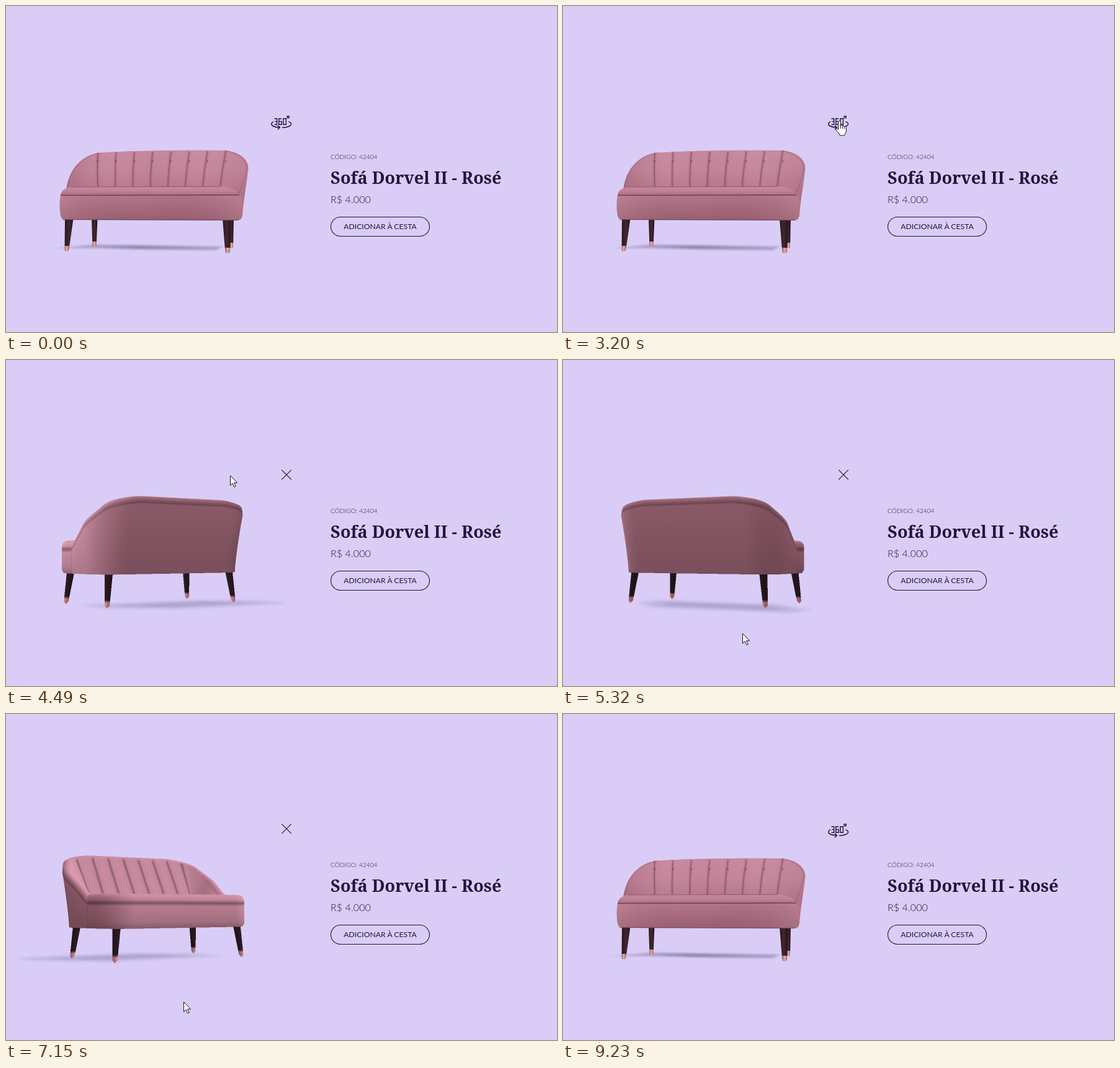
An HTML page with a canvas for the animation above (9.9 s loop, 888x526 px).

```html
<!DOCTYPE html>
<html lang="pt-BR">
<head>
<meta charset="utf-8">
<title>Sofá Dorvel II</title>
<style>
html, body { margin: 0; width: 100%; height: 100%; overflow: hidden; background: #d9cdf7; }
canvas, svg { position: absolute; left: 0; top: 0; display: block; }
text { fill: #221538; font-family: Lato, sans-serif; }
.line { fill: none; stroke: #221538; }
</style>
</head>
<body>
<canvas id="stage" width="888" height="526"></canvas>
<svg width="888" height="526" viewBox="0 0 888 526">
  <text x="523" y="247" font-size="10.2" font-weight="300">CÓDIGO: 42404</text>
  <text x="523" y="287" font-size="27.1" font-weight="600" style="font-family:'Noto Serif',serif">Sofá Dorvel II - Rosé</text>
  <text x="523" y="318" font-size="16.2" font-weight="300">R$ 4.000</text>
  <rect class="line" x="523.5" y="340.5" width="159" height="31" rx="15.5" stroke-width="1.1"/>
  <text x="603" y="360" font-size="12.2" text-anchor="middle">ADICIONAR À CESTA</text>
  <g id="turn" class="line" stroke-width="1.4">
    <path d="M432.5 181.8h4.2v9.4h-4.2M433.2 186.4h3.5M444.2 181.8h-4.4v9.4h4.4v-4.8h-4.4M447 181.8h4.4v9.4h-4.4z"/>
    <path d="M453.2 177.7h2.9v2.9h-2.9z"/>
    <path d="M431 186.6c-4.5 2-4 5.6 0 7.4 3 1.3 6.3 1.8 10 2M437.8 192.6l3.7 3.4-3.7 3.3M445 196.2c8-.2 14.6-2.4 14.6-5.6 0-1.700-1.600-3-4.200-4"/>
  </g>
  <path id="close" class="line" stroke-width="1.2" d="M444.3 177.3l15.500 15.500M459.800 177.300l-15.500 15.500"/>
  <g id="cursor" stroke="#17121f" stroke-linejoin="round" fill="#fdfcff">
    <path id="arrow" d="M.5.5v15.800l3.600-3.300 2.700 5.900 2.500-1.100-2.700-5.700h5z"/>
    <g id="hand">
      <path d="M-2 2C-2-.1 1.600-.1 1.600 2V8.500C1.700 6.600 5 6.600 5 9 5.300 7.500 8 7.700 8 10 8.500 8.800 10.700 9 10.700 11.400V16C10.700 19 8.500 20.500 8 23.400 5 24.200 2 24 0 23.200-.5 20.500-4.300 17.500-6 14.300-6.400 12.600-4.400 11.700-2 14.300z"/>
      <path fill="none" d="M1.600 8.500v4.300M5 9v4M8 10v3.500"/>
    </g>
  </g>
</svg>
<script>
const LOOP = 9900, STEP = 68, SPIN = [3470, 8630];
const $ = id => document.getElementById(id);
const ctx = $('stage').getContext('2d');
const clamp = (v, a, b) => Math.max(a, Math.min(b, v));
const mix = (a, b, k) => a + (b - a) * k;

// Pointer strokes: start, end, bend x, y, goal x, y
const ENTRY = [804, 500], STROKES = [
  [580, 1350, 600, 325, 596, 365],
  [1600, 2590, 85, 262, 308, 249],
  [2640, 3200, 410, 180, 446, 185],
  [3470, 4490, 420, 156, 361, 186],
  [4490, 5450, 310, 270, 286, 464],
  [7150, 8220, 410, 400, 453, 186],
  [8890, 9230, 650, 320, 900, 520]
];
// Time and direction the sofa faces, in degrees
const TURNS = [[3470, -10], [4490, -145], [6130, -275], [7150, -325], [8220, -402], [8560, -425]];

const snap = (t, start) => start + Math.round((t - start) / STEP) * STEP;

function pointer(t) {
  let from = ENTRY;
  for (const [a, b, cx, cy, x, y] of STROKES) {
    if (t < a) break;
    const lin = clamp((snap(t, a) - a) / (b - a), 0, 1);
    const k = lin * lin * (3 - 2 * lin);
    const bend = (p, c, q) => mix(mix(p, c, k), mix(c, q, k), k);
    from = [bend(from[0], cx, x), bend(from[1], cy, y)];
  }
  return from;
}

function yaw(t) {
  const now = snap(t, SPIN[0]);
  const i = TURNS.findIndex(k => now < k[0]);
  if (i < 1) return TURNS[i ? TURNS.length - 1 : 0][1];
  const [a, p] = TURNS[i - 1], [b, q] = TURNS[i];
  return mix(p, q, (now - a) / (b - a));
}

// ---- Sofa mesh: x along the length, y down, z to the front ----
const A = 138, D = 74, R = 40, MID = 12, FLOOR = 80;
const LIGHT = [0.62, -0.62, 0.38], DARK = [124, 78, 91], PALE = [226, 160, 182];
const verts = [], tris = [];

function patch(cols, rows, pos, tint) {
  const at = (i, j) => clamp(i, 0, cols) * (rows + 1) + clamp(j, 0, rows);
  const pts = [], base = verts.length;
  for (let i = 0; i <= cols; i++) for (let j = 0; j <= rows; j++) pts.push(pos(i, j));
  const diff = (a, b) => pts[a].map((v, n) => v - pts[b][n]);
  for (let i = 0; i <= cols; i++) for (let j = 0; j <= rows; j++) {
    const u = diff(at(i + 1, j), at(i - 1, j)), v = diff(at(i, j + 1), at(i, j - 1));
    const n = [v[1] * u[2] - v[2] * u[1], v[2] * u[0] - v[0] * u[2], v[0] * u[1] - v[1] * u[0]];
    const len = Math.hypot(...n) || 1;
    const lit = 0.5 + 0.5 * n.reduce((s, c, m) => s + c * LIGHT[m], 0) / len;
    verts.push([...pts[at(i, j)], ...tint(i, j, clamp(lit, 0, 1))]);
    if (i < cols && j < rows) {
      const a = base + at(i, j), b = base + at(i + 1, j), c = base + at(i + 1, j + 1), d = base + at(i, j + 1);
      tris.push([a, b, c], [a, c, d]);
    }
  }
}

const cloth = (lit, dim) => DARK.map((c, n) => mix(c, PALE[n], Math.pow(lit, 1.4)) * dim);

// Point and outward normal on the rounded footprint
function ring(s) {
  const side = 2 * D, long = 2 * A;
  let x, z;
  if (s < side) [x, z] = [A, D - s];
  else if (s < side + long) [x, z] = [A + side - s, -D];
  else if (s < 2 * side + long) [x, z] = [-A, s - side - long - D];
  else [x, z] = [s - 2 * side - long - A, D];
  const cx = clamp(x, R - A, A - R), cz = clamp(z, R - D, D - R);
  const len = Math.hypot(x - cx, z - cz), nx = (x - cx) / len, nz = (z - cz) / len;
  return { x: cx + nx * R, z: cz + nz * R, nx, nz };
}

// Straight sides, then a rounded cushion edge closed at the middle
function buildSeat() {
  const rows = 14, seam = 8, s = i => i * 4 % 848;
  patch(212, rows, (i, j) => {
    const p = ring(s(i)), a = clamp(j - 9, 0, 4) * Math.PI / 8;
    const y = 30 - 4.7 * Math.min(j, 9) - 9 * Math.sin(a);
    const off = 10 * (Math.cos(a) - 1) - (j ? 0 : 3) - (p.z < 2 ? 4 : 0);
    const pull = j < rows ? 1 : 0;
    return [(p.x + p.nx * off) * pull, y, MID + (p.z + p.nz * off) * pull];
  }, (i, j, lit) => cloth(lit, j === seam && ring(s(i)).z > 6 ? 0.66 : 0.84 + 0.16 * Math.min(1, j / seam)));
}

// Back and arms as one shell: up the outside, over the rail, down the inside
function buildShell() {
  const first = 62, last = 510, cols = 224, outer = 12, rim = outer + 4, rows = rim + 8;
  const pos = i => first + 2 * i;
  function profile(s, j) {
    const k = Math.sin(Math.PI / 2 * clamp(Math.min(s - first, last - s) / 150, 0, 1));
    const top = -12 - 71 * k;
    const flare = y => 20 * Math.pow(Math.max(0, 30 - y) / 115, 1.3) * (0.3 + 0.7 * k) + 0.3;
    if (j <= outer) {
      const y = j < outer ? mix(30, top + 9, j / (outer - 1)) : top + 6.5;
      return [y, flare(y)];
    }
    if (j < rim) {
      const a = (j - outer) * Math.PI / 4;
      return [top + 3 - 6 * Math.sin(a), flare(top) - 7 + 7 * Math.cos(a)];
    }
    const f = (j - rim) / 8;
    return [mix(top + 3, -16, f), mix(flare(top) - 14, -30, f)];
  }
  patch(cols, rows, (i, j) => {
    const p = ring(pos(i)), [y, off] = profile(pos(i), j);
    return [p.x + p.nx * off, y, MID + p.z + p.nz * off];
  }, (i, j, lit) => {
    const m = pos(i) - 286;
    let dim = i < 1 || i === cols || j === outer ? 0.74 : j < outer ? 0.86 + 0.012 * j : 1;
    if (j >= rim && Math.abs(m) < 110) {
      const gap = Math.abs(((m % 30) + 30) % 30 - 15);
      dim *= 1 - 0.3 * Math.exp(-gap * gap / 3) - 0.08 * Math.exp(-gap / 5);
    }
    return cloth(lit, dim);
  });
}

function buildLeg(sx, sz) {
  const rows = 12;
  patch(12, rows, (i, j) => {
    const k = j / rows, r = j < rows ? 6 - 2.6 * k : 0, a = i * Math.PI / 6;
    return [sx * (116 + 6 * k) + r * Math.cos(a), 29 + 51 * k, 10 + sz * (58 + 5 * k) + r * Math.sin(a)];
  }, (i, j, lit) => (j < 10 ? [44, 26, 33] : [200, 135, 137]).map(c => c * (0.65 + 0.5 * lit)));
}

buildSeat();
buildShell();
for (const sx of [-1, 1]) for (const sz of [-1, 1]) buildLeg(sx, sz);

// ---- Projection and depth-buffered drawing at double size ----
const BW = 900, BH = 460, TOP = 190, FAR = 1245;
const buf = document.createElement('canvas');
buf.width = BW;
buf.height = BH;
const bctx = buf.getContext('2d');
const image = bctx.createImageData(BW, BH), depth = new Float32Array(BW * BH);

function project(x, y, z, c, s) {
  const d = x * s - z * c, k = FAR / (FAR + d);
  return [239 + (x * c + z * s) * k, 313 + y * k, d];
}

function fillTri(a, b, c) {
  const area = (b[0] - a[0]) * (c[1] - a[1]) - (b[1] - a[1]) * (c[0] - a[0]);
  if (Math.abs(area) < 1e-6) return;
  const x0 = Math.max(0, Math.ceil(Math.min(a[0], b[0], c[0])));
  const x1 = Math.min(BW - 1, Math.floor(Math.max(a[0], b[0], c[0])));
  const y0 = Math.max(0, Math.ceil(Math.min(a[1], b[1], c[1])));
  const y1 = Math.min(BH - 1, Math.floor(Math.max(a[1], b[1], c[1])));
  const px = image.data;
  for (let y = y0; y <= y1; y++) for (let x = x0; x <= x1; x++) {
    const u = ((b[0] - x) * (c[1] - y) - (b[1] - y) * (c[0] - x)) / area;
    const v = ((c[0] - x) * (a[1] - y) - (c[1] - y) * (a[0] - x)) / area;
    const w = 1 - u - v;
    if (u < -1e-5 || v < -1e-5 || w < -1e-5) continue;
    const d = u * a[2] + v * b[2] + w * c[2], i = y * BW + x;
    if (d >= depth[i]) continue;
    depth[i] = d;
    for (let n = 0; n < 3; n++) px[i * 4 + n] = u * a[3 + n] + v * b[3 + n] + w * c[3 + n];
    px[i * 4 + 3] = 255;
  }
}

function drawTurned(deg) {
  const c = Math.cos(deg * Math.PI / 180), s = Math.sin(deg * Math.PI / 180);
  ctx.save();
  ctx.beginPath();
  ctx.rect(0, 0, 448, 526);
  ctx.clip();
  ctx.filter = 'blur(2px)';
  ctx.fillStyle = 'rgba(84,74,118,.16)';
  for (const d of [0, 35, 70]) {
    ctx.beginPath();
    for (const [x, z] of [[-120, -50], [120, -50], [120, 35], [-120, 35]]) {
      ctx.lineTo(...project(x - d, FLOOR, z - d, c, s).slice(0, 2));
    }
    ctx.fill();
  }
  ctx.restore();

  image.data.fill(0);
  depth.fill(1e9);
  const pts = verts.map(v => {
    const p = project(v[0], v[1], v[2], c, s);
    return [p[0] * 2, (p[1] - TOP) * 2, p[2], v[3], v[4], v[5]];
  });
  for (const [i, j, k] of tris) fillTri(pts[i], pts[j], pts[k]);
  bctx.putImageData(image, 0, 0);
  ctx.drawImage(buf, 0, TOP, BW / 2, BH / 2);
}

// ---- Front view at rest ----
function ramp(x0, y0, x1, y1, ...stops) {
  const g = ctx.createLinearGradient(x0, y0, x1, y1);
  stops.forEach((c, i) => g.addColorStop(i / (stops.length - 1), c));
  return g;
}

function shape(d, fill) {
  ctx.fillStyle = fill;
  ctx.fill(new Path2D(d));
}

function line(d, color, width) {
  ctx.strokeStyle = color;
  ctx.lineWidth = width;
  ctx.stroke(new Path2D(d));
}

function frontLeg(x0, x1, b0, b1, foot) {
  const f = 1 - 9 / (foot - 345), l = mix(x0, b0, f), r = mix(x1, b1, f), y = foot - 9;
  shape(`M${x0} 343H${x1}L${r} ${y}H${l}z`, ramp(x0, 0, x1, 0, '#2a181f', '#43272f', '#22131a'));
  shape(`M${l} ${y}H${r}L${b1} ${foot - 1.5}Q${(b0 + b1) / 2} ${foot + 2} ${b0} ${foot - 1.5}z`,
    ramp(b0, 0, b1, 0, '#a3646a', '#e2b0ae', '#a9696d'));
}

function drawFront() {
  ctx.save();
  ctx.filter = 'blur(1.5px)';
  shape('M74 391L138 385 350 388 338 394 240 393 150 391z',
    ramp(74, 0, 350, 0, 'rgba(100,90,130,.15)', 'rgba(100,90,130,.6)', 'rgba(100,90,130,.35)'));
  ctx.restore();
  frontLeg(138, 147.5, 139.5, 145.5, 389);
  frontLeg(358, 367, 361, 366, 391);
  frontLeg(95, 108.5, 94.5, 101, 396);
  frontLeg(349, 362.5, 353.5, 361, 399);

  const back = 'M97 297C101 264 121 240 152 236.5 205 233 290 232 352 233 376 235 391 247 390.5 262 389 282 383 310 381 338L376 344H300V310H97z';
  shape(back, ramp(0, 233, 0, 300, '#c98ba1', '#c4859a', '#b4768a'));
  shape(back, ramp(97, 0, 391, 0, 'rgba(120,70,90,.25)', 'rgba(210,150,170,.12)', 'rgba(150,90,110,.05)', 'rgba(220,160,180,.1)', 'rgba(130,80,100,.12)'));
  for (let i = 0; i < 8; i++) {
    const x = 148 + 29.5 * i, foot = 148 + 28.2 * i;
    const curve = `M${x} ${236.5 - i * 0.4}Q${(x + foot) / 2 - 1.5} 262 ${foot} 292`;
    line(curve, 'rgba(125,72,92,.16)', 6);
    line(curve, 'rgba(105,58,78,.62)', 1.2);
    shape(`M${x - 2} 249h3v3h-3z`, 'rgba(95,50,70,.4)');
  }
  line('M352 233.5C377 237 389 250 388 263 385 281 378 296 374 304', 'rgba(110,62,82,.45)', 1);
  line('M99 292C104 264 123 242 152 237.5', 'rgba(115,66,86,.35)', 1);

  shape('M88 306C88 297 97 292 112 291.5L340 291C362 291 374 297 377 306z', ramp(0, 291, 0, 306, '#c7889d', '#c08196', '#a96c7f'));
  line('M105 292L345 291.3', 'rgba(105,58,78,.55)', 1);
  const base = 'M88 305.5C86 314 86 334 89 341Q91 345 97 345L371 346Q379 346 380.5 340L381 312 376 305z';
  shape(base, ramp(0, 305, 0, 346, '#b5778a', '#a66b7d', '#966070'));
  shape(base, ramp(87, 0, 381, 0, 'rgba(215,155,175,.25)', 'rgba(150,95,110,0)', 'rgba(140,85,105,.12)', 'rgba(205,145,165,.3)'));
  line('M88 305.5L376 305', '#70424f', 1.3);
  line('M91 344.5L374 345.5', 'rgba(85,48,60,.6)', 1.2);
}

// ---- Playback ----
let pose = null;

function render(now) {
  const t = now % LOOP, spin = t >= SPIN[0] && t < SPIN[1];
  const next = spin ? yaw(t) : 'rest';
  if (next !== pose) {
    pose = next;
    ctx.clearRect(0, 0, 888, 526);
    if (spin) drawTurned(next);
    else drawFront();
  }
  const [x, y] = pointer(t);
  const onButton = x > 523 && x < 683 && y > 340 && y < 372;
  const onIcon = x > 426 && x < 462 && y > 174 && y < 202;
  const show = (id, on) => $(id).style.display = on ? '' : 'none';
  show('turn', !spin);
  show('close', spin);
  show('cursor', t >= 580 && t < 9230);
  show('hand', onButton || onIcon);
  show('arrow', !(onButton || onIcon));
  $('cursor').setAttribute('transform', `translate(${x.toFixed(1)} ${y.toFixed(1)})`);
}

function tick() {
  render(performance.now());
  requestAnimationFrame(tick);
}
tick();
</script>
</body>
</html>
```
